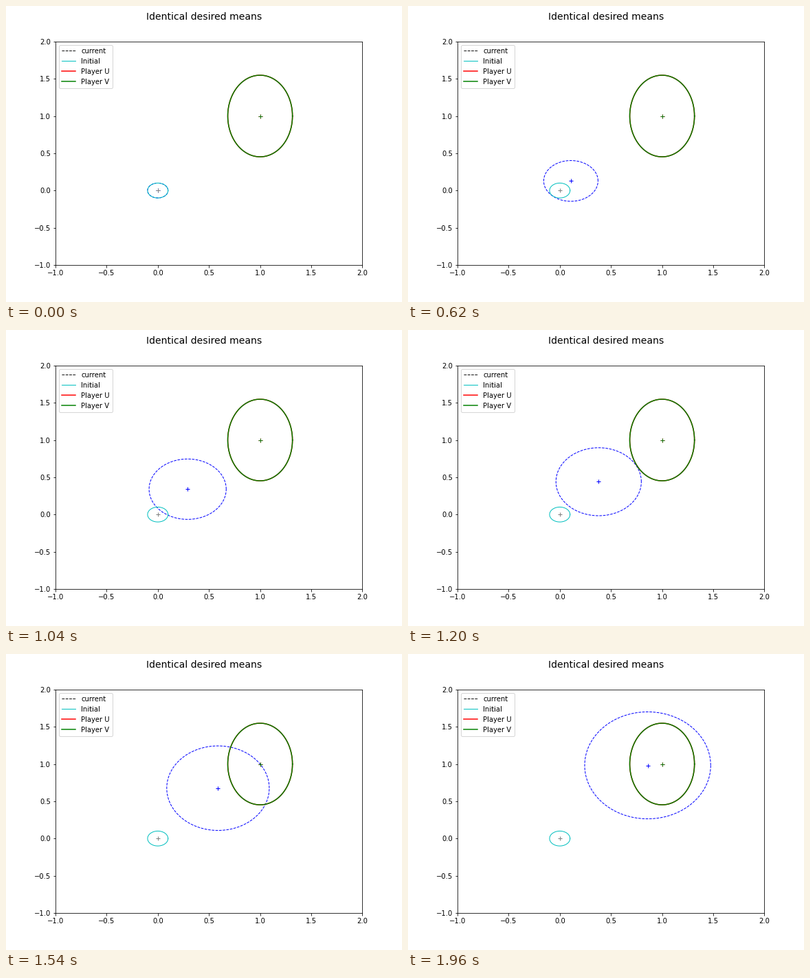
A matplotlib script that plays this animation: 576x432 px, repeating every 1980 ms.

```python
import numpy as np
import matplotlib.pyplot as plt
from matplotlib.animation import FuncAnimation
from matplotlib.lines import Line2D

FRAMES, INTERVAL = 99, 20
CYAN = (0, 0.75, 0.75)

plt.rcParams.update({
    "font.family": "DejaVu Sans",
    "font.size": 10,
    "lines.markersize": 6,
    "toolbar": "None",
})

theta = np.linspace(0, 2 * np.pi, 200)
s = np.arange(FRAMES) / (FRAMES - 1)

# Mean of the moving distribution over normalised time
mean_x = s**2 * (1.105 - 0.246 * s**2)
mean_y = s**2 * (1.37 - 0.212 * s - 0.176 * s**2)

# Standard deviations: smooth quartics through a few key values
keys = np.array([0, 16, 31, 52, 68, 86, 98]) / 98
weights = [5, 1, 1, 1, 1, 1, 3]


def smooth(values):
    return np.polyval(np.polyfit(keys, values, 4, w=weights), s)


dev_x = smooth([0.1, 0.183, 0.265, 0.377, 0.457, 0.547, 0.616])
dev_y = smooth([0.1, 0.185, 0.2725, 0.406, 0.508, 0.629, 0.718])


def ellipse(cx, cy, rx, ry):
    return cx + rx * np.cos(theta), cy + ry * np.sin(theta)


fig = plt.figure(figsize=(8, 6), dpi=72, facecolor="white")
fig.subplots_adjust(left=0.125, right=0.9, bottom=0.125, top=0.88)
ax = fig.add_subplot()
ax.set(xlim=(-1, 2), ylim=(-1, 2),
       xticks=np.arange(-1, 2.1, 0.5), yticks=np.arange(-1, 2.1, 0.5))
fig.suptitle("Identical desired means", fontsize=14)


def add(cx, cy, rx, ry, color, mark, lw=1.0, style="-"):
    outline, = ax.plot(*ellipse(cx, cy, rx, ry), color=color, lw=lw, ls=style)
    center, = ax.plot([cx], [cy], "+", color=mark)
    return outline, center


current, dot = add(0, 0, 0.1, 0.1, "blue", "blue", style="--")
add(0, 0, 0.1, 0.1, CYAN, "#808080")
for color, mark in (("red", "red"), ("green", "#106800")):
    add(1, 1, np.sqrt(0.1), np.sqrt(0.3), color, mark, lw=1.5)

ax.legend(handles=[
    Line2D([], [], color="black", lw=1, ls="--", label="current"),
    Line2D([], [], color=CYAN, lw=1, label="Initial"),
    Line2D([], [], color="red", lw=1.5, label="Player U"),
    Line2D([], [], color="green", lw=1.5, label="Player V"),
], loc="upper left")


def update(i):
    current.set_data(*ellipse(mean_x[i], mean_y[i], dev_x[i], dev_y[i]))
    dot.set_data([mean_x[i]], [mean_y[i]])
    return current, dot


anim = FuncAnimation(fig, update, frames=FRAMES, interval=INTERVAL,
                     repeat=True, repeat_delay=0, blit=False)
plt.show()
```
